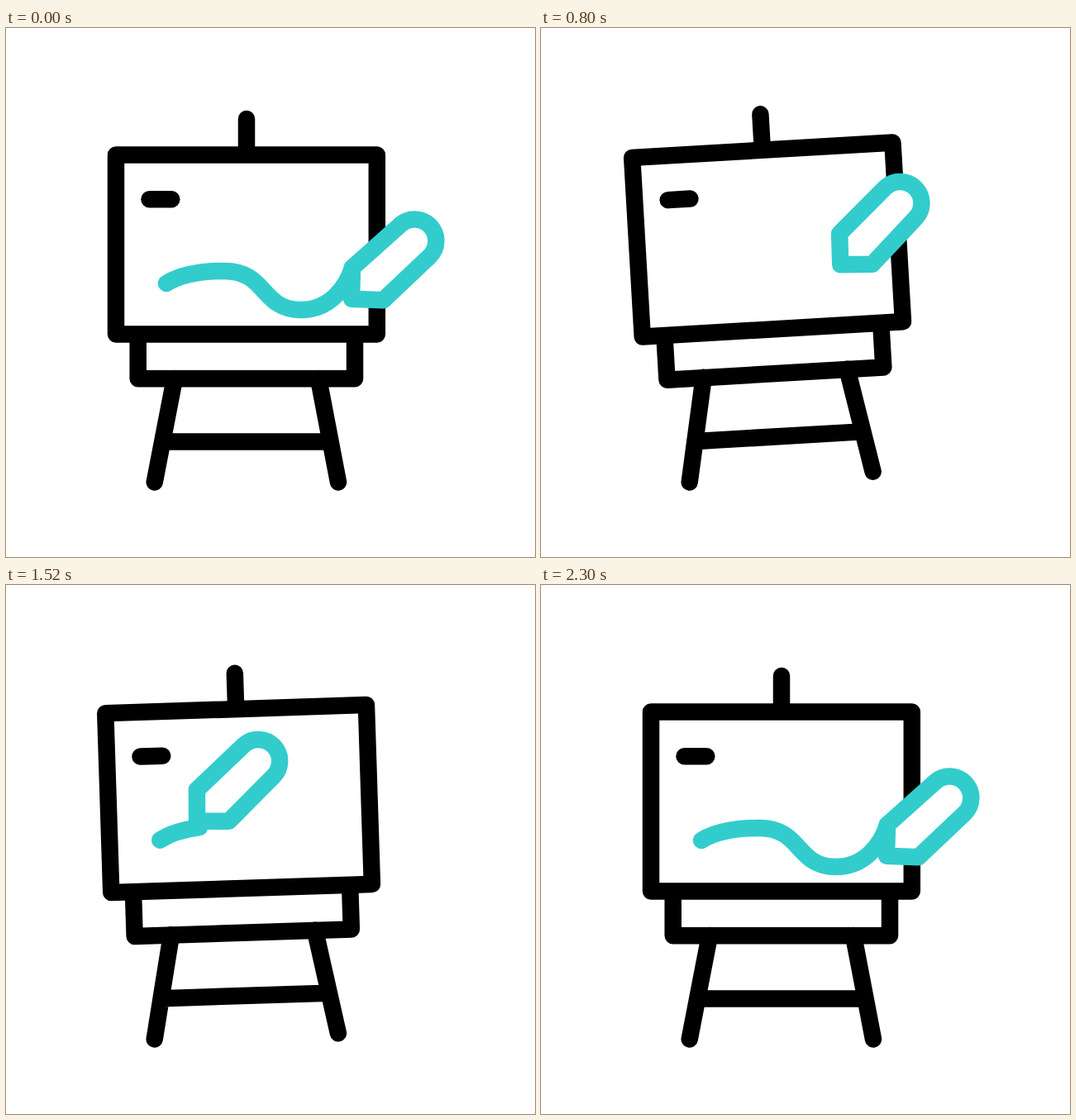
These frames come from a looping animation (640 by 640 pixels, 2.4 s). An HTML page:

```html
<!DOCTYPE html>
<html lang="en">
<head>
<meta charset="utf-8">
<title>Easel</title>
<style>
  html, body { margin: 0; width: 100%; height: 100%; overflow: hidden; background: #fff; }
  svg { display: block; width: 100vw; height: 100vh; }
  path { fill: none; stroke-width: 20.5; stroke-linecap: round; stroke-linejoin: round; }
  .ink { stroke: #000; }
  .teal { stroke: #33cccc; }
  .paper { fill: #fff; }
</style>
</head>
<body>
<svg viewBox="0 0 640 640">
  <g id="easel">
    <path class="ink" d="M204 424L179.7 549.5M378 424L402 549.5M191 500.5H391"/>
    <path class="ink" d="M291 110V152"/>
    <path class="ink" d="M159.7 370.5V424.3H422V370.5"/>
    <path class="ink paper" d="M133 153.5H448.8V370.5H133Z"/>
    <path class="ink" d="M173.5 207.2H200.3"/>
    <path class="teal" id="line" d="M194 309C212 298 238 294 264 294C316 294 308 341 357 341C392 341 412 313 419 290"/>
    <path class="teal paper" id="pencil" d="M419 290L477.6 237.7A26 26 0 0 1 512.4 276.3L456.5 329.3L418 327.7Z"/>
  </g>
</svg>
<script>
const LOOP = 2400;
const FOOT = "179.7 549.5";
const el = id => document.getElementById(id);
const easel = el("easel"), line = el("line"), pencil = el("pencil");

// Pencil offset while drawing, relative to its resting place
const track = document.createElementNS("http://www.w3.org/2000/svg", "path");
track.setAttribute("d", "M-230 -23C-205 -38 -185 -41 -165 -41C-110 -41 -95 3 -55 3C-35 3 -15 2 0 0");
const trackLen = track.getTotalLength();
const lineLen = line.getTotalLength();

const span = (t, a, b) => Math.min(1, Math.max(0, (t - a) / (b - a)));
const smooth = p => p * p * (3 - 2 * p);
const soft = p => (p + smooth(p)) / 2;
const ease = (t, a, b) => smooth(span(t, a, b));

// Slow tilt, drop, then one small bounce
function tilt(t) {
  if (t < 1300) return 6 * soft(span(t, 210, 1300));
  if (t < 1650) return 6 * (1 - ease(t, 1300, 1650));
  if (t < 2040) return 2.1 * ease(t, 1650, 2040);
  return 2.1 * (1 - ease(t, 2040, 2300));
}

function pencilAt(t) {
  if (t < 1230) {
    const u = ease(t, 640, 1240);
    return { x: -230 * u, y: -23 * u - 180 * u * (1 - u) };
  }
  return track.getPointAtLength(trackLen * ease(t, 1220, 2200));
}

function trim(from, to) {
  const len = (to - from) * lineLen;
  line.style.visibility = len > 0.01 ? "visible" : "hidden";
  line.setAttribute("stroke-dasharray", `${Math.max(len, 0.01)} 9999`);
  line.setAttribute("stroke-dashoffset", -from * lineLen);
}

function draw(t) {
  easel.setAttribute("transform", `rotate(${-tilt(t)} ${FOOT})`);
  const p = pencilAt(t);
  pencil.setAttribute("transform", `translate(${p.x} ${p.y})`);
  if (t < 1000) trim(ease(t, 210, 640), 1);
  else trim(0, ease(t, 1220, 2300));
}

const start = performance.now();
function tick() {
  draw((performance.now() - start) % LOOP);
  requestAnimationFrame(tick);
}
draw(0);
requestAnimationFrame(tick);
</script>
</body>
</html>
```
